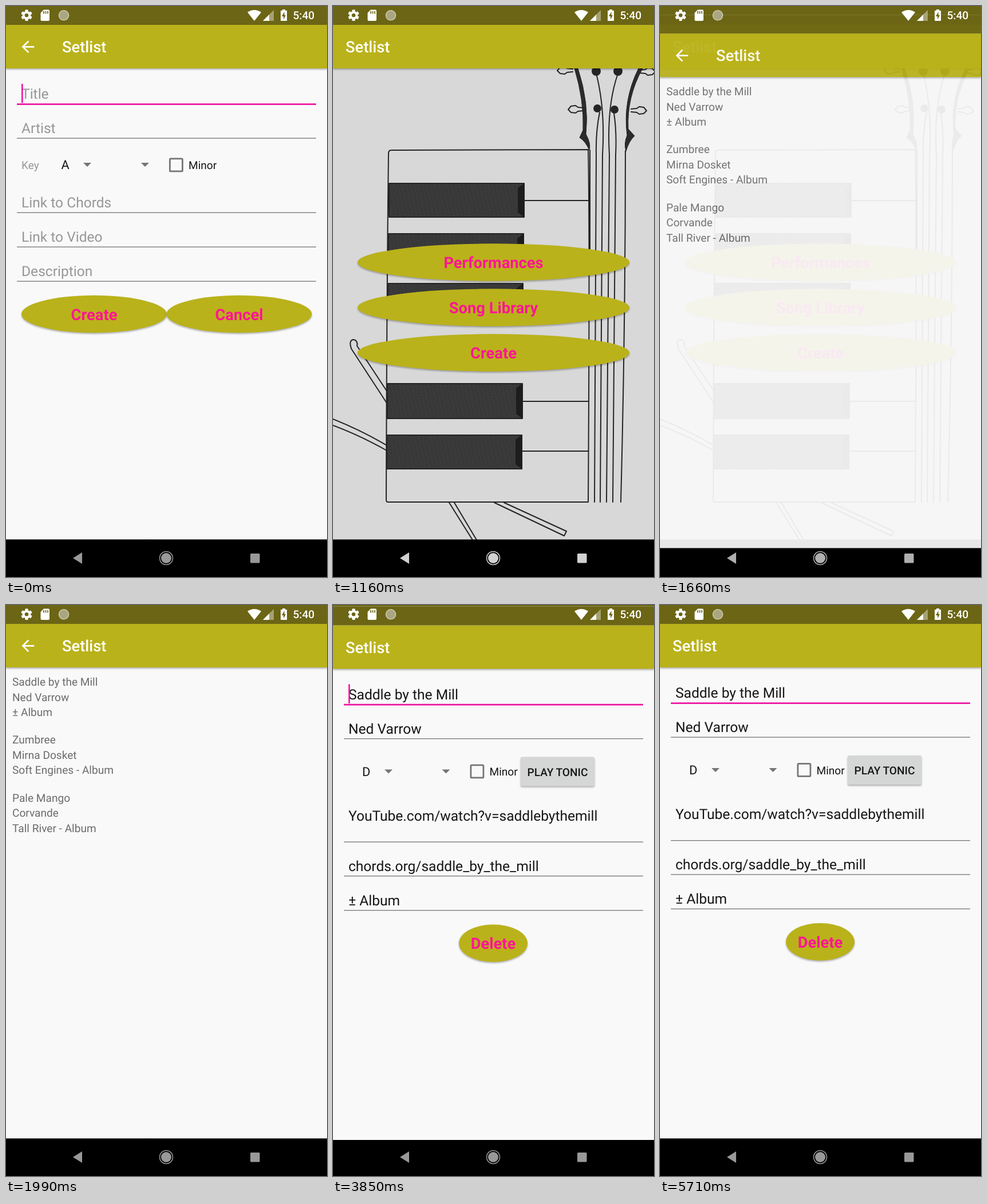
An HTML page for the animation above (6040 ms loop, 561 by 998 pixels).

```html
<!DOCTYPE html>
<html lang="en">
<head>
<meta charset="utf-8">
<title>Setlist</title>
<style>
html, body { margin: 0; width: 100%; height: 100%; overflow: hidden; background: #000; }
svg { display: block; width: 100%; height: 100%; }
text { font-family: Roboto, sans-serif; text-rendering: geometricPrecision; }
.raised { filter: drop-shadow(0 2px 1.5px rgba(0, 0, 0, .3)); }
.ink { fill: none; stroke: #242424; stroke-width: 2; stroke-linecap: round; stroke-linejoin: round; }
</style>
</head>
<body>
<svg id="stage" viewBox="0 0 561 998"></svg>
<script>
const OLIVE = '#bab21a', DARK = '#6b6515', PINK = '#ff1595', LINE = '#ee14a0';
const INK = '#161616', HINT = '#979797', GREY = '#757575';

// drawing helpers
const rect = (x, y, w, h, fill, more = '') =>
  `<rect x="${x}" y="${y}" width="${w}" height="${h}" fill="${fill}" ${more}/>`;
const text = (x, y, s, size, fill, weight = 400, anchor = 'start') =>
  `<text x="${x}" y="${y}" font-size="${size}" fill="${fill}" font-weight="${weight}" text-anchor="${anchor}">${s}</text>`;
const path = (d, more = 'class="ink"') => `<path d="${d}" ${more}/>`;
const dot = (x, y, r, fill) => `<circle cx="${x}" cy="${y}" r="${r}" fill="${fill}"/>`;

const oval = (x, y, rx, label) =>
  `<ellipse class="raised" cx="${x}" cy="${y}" rx="${rx}" ry="32.7" fill="${OLIVE}"/>` +
  text(x, y + 10, label, 27.3, PINK, 700, 'middle');
const field = (y, s, color, lineY = y + 8.5) =>
  text(27, y, s, 24.55, color) + rect(19, lineY, 523, 1.3, GREY);
const firstField = (s, color, id) =>
  text(27, 162, s, 24.55, color) + rect(19, 170.3, 523, 2.7, LINE) +
  rect(27, 136, 2.6, 33.5, LINE, `id="${id}"`);
const drop = (x, y) => path(`M${x - 7} ${y}h14l-7 7z`, `fill="${GREY}"`);
const checkbox = (x, y) =>
  rect(x + 1.4, y + 1.4, 22, 22, 'none', `rx="1.5" stroke="${GREY}" stroke-width="2.8"`) +
  text(x + 34, y + 19.5, 'Minor', 19.1, INK);

const screen = (id, body, back) => `<g id="${id}">
  ${rect(0, 0, 561, 932.5, '#f9f9fa')}${body}
  ${rect(0, 33, 561, 76, OLIVE, 'class="raised"')}${rect(0, 0, 561, 33, DARK)}
  ${back ? path('M20 11H7.83l5.59-5.59L12 4l-8 8 8 8 1.41-1.41L7.83 13H20z',
    'fill="#fff" transform="translate(22 55) scale(1.364)"') : ''}
  ${text(back ? 98 : 22, 81, 'Setlist', 27.3, '#fff', 500)}
  ${rect(0, 932.5, 561, 65.5, '#000')}</g>`;

const blackKey = (x, y, h) =>
  rect(x, y, 236, h, '#353535') + rect(x, y, 236, h, 'url(#hatch)') +
  path(`M${x} ${y}h236v${h}h-236z`) +
  path(`M${x + 236} ${y}l-11 8v${h - 16}l11 8z`, 'fill="#1d1d1d"');
const peg = (x, y, dir) =>
  path('M0 -3l10 -1 4 -3 8 1 5 6 -5 5 -8 1 -4 -3 -10 -1', `class="ink" transform="translate(${x} ${y}) scale(${dir} 1)"`);

const drawing = rect(0, 109, 561, 823.5, '#d8d8d8') +
  // drumsticks
  path('M94 694L32 599Q27 584 36 583Q44 585 42 594L94 673') +
  path('M0 722Q50 742 94 768M0 733Q48 751 94 777') +
  path('M203 868L245 935M212 868L252 935M282 868L404 926L408 918L299 868') +
  // keyboard
  path('M102 252L446 251Q449 400 446 867L96 867Q93 867 93 863Q94 500 97 258Q97 252 102 252') +
  [[98, 310, 59], [97, 398, 59], [96, 485, 60], [95, 660, 61], [94, 750, 59]]
    .map(k => blackKey(...k)).join('') +
  path('M334 340H448M331 691H446M331 778H446') +
  // guitar
  path('M449 252V470M511 253Q511 560 503 867') +
  path('M466 186Q459 220 460 260L457 867M460 118Q476 180 471 260L467 867') +
  path('M498 118Q478 175 483 260L478 867M491 187Q496 220 494 260L489 867') +
  path('M422 109Q439 165 437 217L431 230Q441 236 448 252Q451 240 442 224Q448 170 428 109z', 'fill="#2b2b2b" stroke="#222"') +
  path('M541 109Q513 160 516 215L527 227Q517 236 512 254Q508 240 514 226Q506 165 534 109z', 'fill="#2b2b2b" stroke="#222"') +
  dot(460, 114, 8, '#252525') + dot(498, 114, 8, '#252525') +
  dot(462, 179, 7, '#252525') + dot(492, 181, 7, '#252525') +
  peg(438, 181, -1) + peg(521, 183, 1) + peg(419, 113, -1) + peg(536, 115, 1);

const songs = [
  ['Saddle by the Mill', 'Ned Varrow', '± Album'],
  ['Zumbree', 'Mirna Dosket', 'Soft Engines - Album'],
  ['Pale Mango', 'Corvande', 'Tall River - Album'],
];

const main = drawing + oval(280.5, 448, 237.5, 'Performances') +
  oval(280.5, 527, 237.5, 'Song Library') + oval(280.5, 606, 237.5, 'Create');

const create = firstField('Title', HINT, 'createCaret') + field(222, 'Artist', HINT) +
  text(27, 285, 'Key', 19.1, HINT) + text(96.5, 285, 'A', 21.8, INK) +
  drop(142, 274) + drop(243, 274) + checkbox(285, 265.5) +
  field(352, 'Link to Chords', HINT) + field(412, 'Link to Video', HINT) +
  field(472, 'Description', HINT) +
  oval(154, 538.5, 127, 'Create') + oval(407.5, 538.5, 127, 'Cancel');

const list = songs.map((song, i) => song.map((s, j) =>
  text(11, 141 + i * 101.3 + j * 26.5, s, 19.1, '#6c6c6c')).join('')).join('');

const edit = firstField(songs[0][0], INK, 'editCaret') + field(222, songs[0][1], INK) +
  text(51, 296, 'D', 21.8, INK) + drop(97, 285) + drop(197.5, 285) + checkbox(239.5, 276) +
  rect(328, 263, 129, 51, '#d5d6d6', 'rx="2.5" class="raised"') +
  text(392.5, 296, 'PLAY TONIC', 19.1, INK, 500, 'middle') +
  field(374, 'YouTube.com/watch?v=saddlebythemill', INK, 411) +
  field(462, 'chords.org/saddle_by_the_mill', INK) + field(522, songs[0][2], INK) +
  oval(280, 588.7, 60, 'Delete');

const teeth = [0, 60, 120].map(a => rect(-2.6, -9.8, 5.2, 19.6, '#fff', `rx="1" transform="rotate(${a})"`)).join('');
const status = `<g transform="translate(36 16.3)">${teeth}${dot(0, 0, 7.3, '#fff')}${dot(0, 0, 3.3, DARK)}</g>` +
  path('M66 6.500H74Q76 6.500 76 8.500V24Q76 26 74 26H62.500Q60.500 26 60.500 24V12z', 'fill="#fff"') +
  [66, 69.5, 73].map(x => rect(x - .8, 9, 1.7, 4.5, DARK)).join('') +
  dot(101, 16.3, 9, '#aaa681') +
  '<circle cx="101" cy="16.300" r="8.500" fill="none" stroke="#e4e2d0" stroke-width="1.500" stroke-dasharray="1.500 1"/>' +
  path('M422 11Q434 3 446 11L434 26z', 'fill="#fff"') +
  path('M468 7V26H449z', 'fill="#fff" opacity=".4"') + path('M460 15V26H449z', 'fill="#fff"') +
  path('M483 8V6H488V8H491V26H480V8z', 'fill="#fff"') +
  path('M486.500 10L482 18H485V23.500L489 16H486.500z', `fill="${DARK}"`) +
  text(501.5, 23.3, '5:40', 19.1, '#fff', 500);

const nav = `<g id="nav">${path('M117 965L133 955V975z', 'fill="#fff"')}
  <circle cx="280" cy="965" r="11.500" fill="none" stroke="#fff" stroke-width="1.500"/>
  ${dot(280, 965, 9, '#fff')}${rect(427, 957, 16.5, 16.5, '#fff', 'rx="1.500"')}</g>`;

const $ = id => document.getElementById(id);
$('stage').innerHTML = `<defs><pattern id="hatch" width="7" height="5" patternUnits="userSpaceOnUse" patternTransform="rotate(-12)">
  <path d="M0 1.500H5M3 4H7" stroke="#484848" stroke-width=".8"/></pattern></defs>` +
  screen('main', main) + screen('create', create, true) +
  screen('list', list, true) + screen('edit', edit) + status + nav;

const LOOP = 6040, TICK = 41.5, SLIDE = 80;
const clamp = v => Math.max(0, Math.min(1, v));
const tick = t => Math.floor(t / TICK + .05) * TICK;

function place(id, y, alpha) {
  $(id).setAttribute('transform', `translate(0 ${y})`);
  $(id).setAttribute('opacity', alpha);
  $(id).setAttribute('display', alpha > 0 ? 'inline' : 'none');
}

// a screen rises into place while fading in; lead is the time already run at its first picture
function open(id, t, start, lead) {
  if (t < start) return place(id, SLIDE, 0);
  const e = lead + tick(t - start);
  place(id, SLIDE * (1 - clamp(e / 350)) ** 5, 1 - (1 - clamp(e / 200)) ** 4);
}

function close(id, t, start, lead) {
  const e = t < start ? 0 : lead + tick(t - start);
  place(id, SLIDE * clamp(e / 250) ** 4, 1 - clamp((e - 100) / 150));
}

function draw(now) {
  const t = now % LOOP;
  close('create', t, 40, 10);
  open('list', t, 1570, 16);
  open('edit', t, 3720, 50);
  const caretOn = t < 4720 || (t >= 5220 && t < 5710);
  $('editCaret').setAttribute('opacity', caretOn ? 1 : 0);
  // navigation keys brighten quickly, then dim slowly
  $('nav').setAttribute('opacity', .6 + .4 * (clamp((t - 40) / 250) - clamp((t - 490) / 1500)));
}

const begin = performance.now();
function loop() {
  draw(performance.now() - begin);
  requestAnimationFrame(loop);
}
loop();
</script>
</body>
</html>
```
